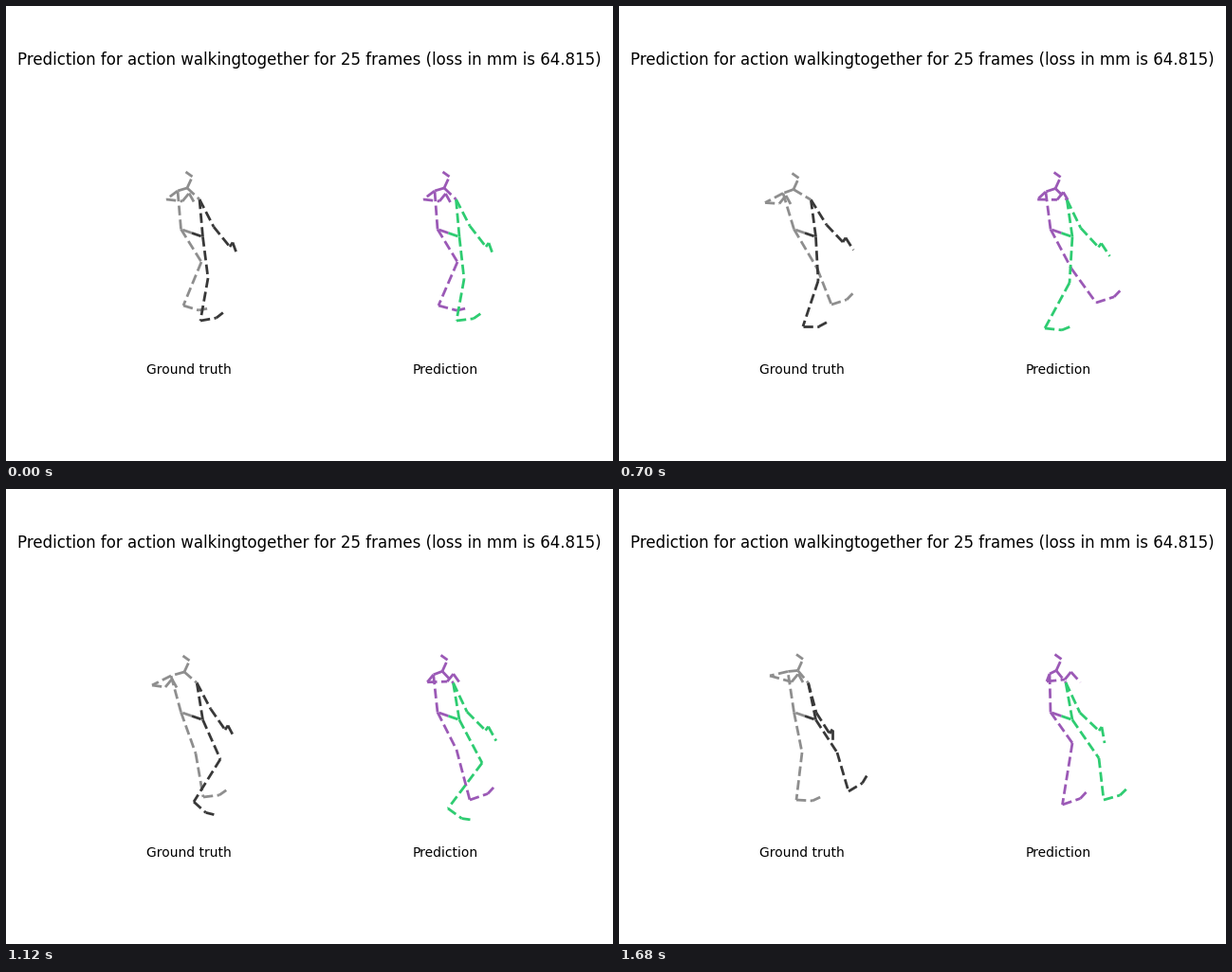
Write a matplotlib script that moves like this. It is 640 by 480 pixels and loops after 1.75 s.

```python
import numpy as np
import matplotlib.pyplot as plt
from matplotlib.animation import FuncAnimation

W, H, DPI = 640, 480, 100
FRAMES, INTERVAL = 25, 70
TOE_LENGTH, TOE_BEND = 9, 28

# Slow parts need three key poses, the stride needs five
TIMES = {3: (0, 12, 24), 5: (0, 4, 10, 16, 24)}


def track(*keys):
    """Smooth path through a few key values, one row per frame."""
    p = np.array(keys, float).reshape(len(keys), -1)
    t = np.array(TIMES[len(p)], float)
    slope = np.gradient(p, t, axis=0, edge_order=2)
    f = np.arange(FRAMES)
    i = np.clip(np.searchsorted(t, f, side="right") - 1, 0, len(t) - 2)
    h = (t[i + 1] - t[i])[:, None]
    u = (f - t[i])[:, None] / h
    return ((1 + 2 * u) * (1 - u) ** 2 * p[i]
            + u * (1 - u) ** 2 * h * slope[i]
            + u * u * (3 - 2 * u) * p[i + 1]
            + u * u * (u - 1) * h * slope[i + 1])


def still(x, y):
    return np.tile([float(x), float(y)], (FRAMES, 1))


def polar(length, degrees):
    a = np.radians(degrees)
    return length * np.hstack([np.cos(a), -np.sin(a)])


def leg(knee, ankle, pitch, foot_length):
    """The foot is rigid: it only tilts about the ankle."""
    foot = ankle + polar(foot_length, pitch)
    return [knee, ankle, foot, foot + polar(TOE_LENGTH, pitch + TOE_BEND)]


def arm(shoulder, elbow, wrist, thumb, finger):
    """Thumb and finger ride on the wrist as offsets."""
    return [shoulder, elbow, wrist, wrist + thumb, wrist + thumb + finger]


def head(neck):
    return [neck, neck + (5.5, -12), neck + (-1.5, -17)]


truth = dict(
    x=196, colors=("#8e8e8e", "#383838"),
    legs=(
        leg(track((206, 270), (208, 271), (209, 277), (200, 279), (193, 278)),
            track((187, 316), (220, 311), (224, 315), (208, 325), (187, 328)),
            track(-17, 20, 18, 7, -3), 17),
        leg(track((213, 287), (209, 288), (210, 290), (226, 285), (230, 278)),
            track((205, 332), (201, 334), (194, 338), (198, 330), (242, 319)),
            track(10, 9, 0, -42, 31), 17),
    ),
    arms=(
        arm(track((181, 195), (179, 195), (173, 197.5), (174, 197), (178, 192.5)),
            track((169, 204), (165, 204), (154, 207.5), (154, 207), (159, 197)),
            track((186, 206), (182, 205.5), (169, 208.5), (168, 209), (182, 203.5)),
            (7, -8.5), (5, 9)),
        arm(track((204, 204), (202, 204.5), (199.5, 204.5)),
            track((219, 233), (218, 231), (208, 236)),
            track((236, 254), (240, 251), (236, 249), (231, 254), (222, 258)),
            (3, -4.5), track((4, 11), (8, 13), (0, 11))),
    ),
    head=head(track((191, 192), (190, 192), (184, 193.5), (188, 193), (188.5, 191.5))),
)

guess = dict(
    x=466.5, colors=("#9b59b6", "#2ecc71"),
    legs=(
        leg(track((476, 270), (477, 273), (477, 277), (475, 275), (478, 268)),
            track((456, 316), (492, 314), (503, 313), (489, 328), (467.5, 333)),
            track(-15, 15, 18, 19, 19), 20),
        leg(track((483, 288), (479, 288), (475, 292), (502, 289), (506, 284)),
            track((475, 332), (466, 334.5), (449, 340), (466, 337), (511, 328)),
            track(7, 4, -6, -36, 16), 18),
    ),
    arms=(
        arm(track((452, 195), (450, 196), (454, 195)),
            track((440, 204), (442, 204), (451, 203)),
            track((457, 206), (463, 204), (470, 201)),
            (6.5, -8), track((5, 9), (5, 8), (10, 11))),
        arm(track((474.5, 204), (472, 204.5), (471, 204)),
            track((489, 232), (486.5, 234.5), (486, 236)),
            track((506, 254), (505.5, 254.5), (506, 255)),
            (3, -4), track((4, 11), (9, 14), (3, 17))),
    ),
    head=head(track((462, 192), (460, 192.5), (461, 191.5))),
)

fig = plt.figure(figsize=(W / DPI, H / DPI), dpi=DPI, facecolor="white")
ax = fig.add_axes([0, 0, 1, 1])
ax.set_xlim(0, W)
ax.set_ylim(H, 0)
ax.axis("off")

for x, y, size, label in (
    (320, 62, 12, "Prediction for action walkingtogether for 25 frames (loss in mm is 64.815)"),
    (193, 388, 10, "Ground truth"),
    (463, 388, 10, "Prediction"),
):
    ax.text(x, y, label, fontsize=size, family="DejaVu Sans", ha="center")

bones = []


def add_chain(joints, color):
    for a, b in zip(joints, joints[1:]):
        line, = ax.plot([], [], "--", lw=2, color=color)
        bones.append((line, a, b))


def add_body(x, colors, legs, arms, head):
    root = still(x, 239.5)
    hips = still(x - 11.5, 235.5), still(x + 11.5, 243.5)
    for hip, limb, color in zip(hips, legs, colors):
        add_chain([hip] + limb, color)
        add_chain([root, hip], color)
    for hip, limb, color in zip(hips, arms, colors):
        add_chain([hip] + limb, color)
        add_chain([head[0], limb[0]], colors[0])
    add_chain(head, colors[0])


add_body(**truth)
add_body(**guess)


def update(frame):
    for line, a, b in bones:
        line.set_data(*zip(a[frame], b[frame]))
    return [bone[0] for bone in bones]


anim = FuncAnimation(fig, update, frames=FRAMES, interval=INTERVAL,
                     repeat=True, repeat_delay=0)
plt.show()
```
